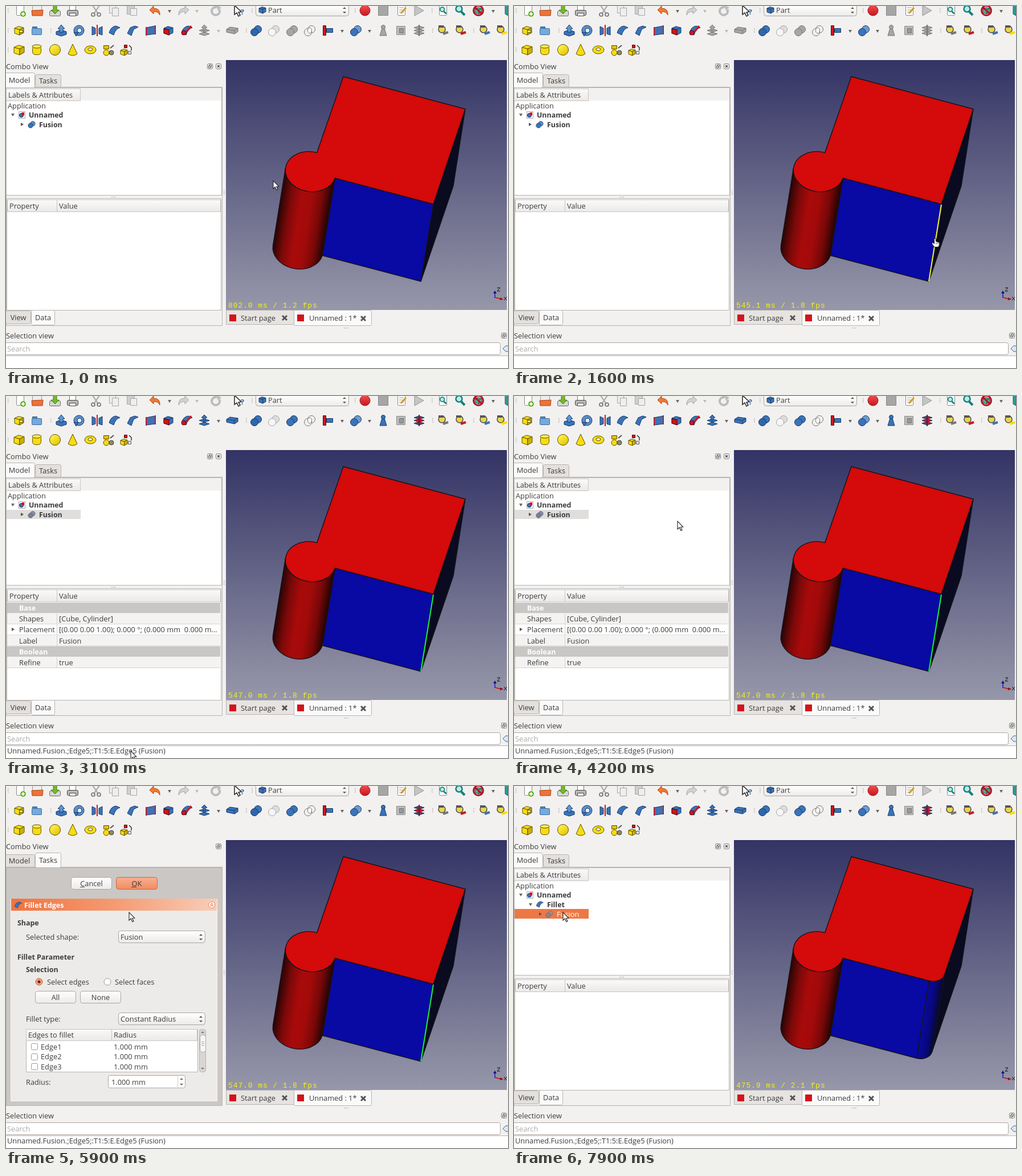
Recreate the animation shown at these times as an HTML page with a canvas. Size 881 px wide and 636 px high, loop 8000 ms.

```html
<!DOCTYPE html>
<html lang="en">
<head>
<meta charset="utf-8">
<title>Fillet an edge</title>
<style>
html, body { margin: 0; width: 881px; height: 636px; overflow: hidden; background: #f2f1f0; }
canvas { display: block; }
</style>
</head>
<body>
<canvas id="stage" width="881" height="636"></canvas>
<script>
const g = document.getElementById('stage').getContext('2d');
const FACE = '"Open Sans", "Noto Sans", sans-serif';
const BG = '#f2f1f0', INK = '#3c3c3c', LINE = '#b8b4b0';
const BLUE = '#3b73b9', NAVY = '#173a68', YELLOW = '#f7dc10', OLIVE = '#5c5000';
const GRAY = '#a6a6a6', DIM = '#747474', RED = '#d0141c', ORANGE = '#ee7845';
const PI = Math.PI;

// ---- basic drawing ----
function paint(fill, stroke, w = 1) {
  if (fill) { g.fillStyle = fill; g.fill(); }
  if (stroke) { g.strokeStyle = stroke; g.lineWidth = w; g.stroke(); }
}
function rect(x, y, w, h, fill, stroke, r = 0) {
  const o = stroke ? 0.5 : 0;
  g.beginPath();
  g.roundRect(x + o, y + o, w - 2 * o, h - 2 * o, r);
  paint(fill, stroke);
}
function disc(x, y, r, fill, stroke, w, ry = r) {
  g.beginPath();
  g.ellipse(x, y, r, ry, 0, 0, 2 * PI);
  paint(fill, stroke, w);
}
function trace(p) {
  g.beginPath();
  for (let i = 0; i < p.length; i += 2) g.lineTo(p[i], p[i + 1]);
}
function poly(p, fill, stroke, w) { trace(p); g.closePath(); paint(fill, stroke, w); }
function line(p, stroke, w) { trace(p); paint(null, stroke, w); }
function at(x, y, draw, ...args) { g.save(); g.translate(x, y); draw(...args); g.restore(); }
function text(s, x, y, color = INK, bold = false, align = 'left') {
  g.font = bold ? `bold 12.4px ${FACE}` : `12.8px ${FACE}`;
  g.fillStyle = color;
  g.textAlign = align;
  g.fillText(s, x, y + 4.5);
}
function ramp(x0, y0, x1, y1, ...colors) {
  const r = g.createLinearGradient(x0, y0, x1, y1);
  colors.forEach((c, i) => r.addColorStop(i / (colors.length - 1), c));
  return r;
}
const down = (x, y, c = '#666') => poly([x - 3, y - 2, x + 3, y - 2, x, y + 3], c);
const right = (x, y) => poly([x - 2, y - 3, x + 3, y, x - 2, y + 3], '#555');
function dots(x, y, vertical = true) {
  for (let i = -4; i <= 4; i += 3) rect(x + (vertical ? 0 : i), y + (vertical ? i : 0), 1.5, 1.5, '#b4b0ac');
}

// ---- toolbar icons, drawn around their own centre ----
function box(c, edge, s = 9) {
  poly([-s, -s * .5, s * .1, -s * .2, s * .1, s, -s, s * .6], c, edge);
  poly([-s, -s * .5, -s * .1, -s * .9, s, -s * .6, s * .1, -s * .2], c, edge);
  poly([s * .1, -s * .2, s, -s * .6, s, s * .5, s * .1, s], edge === OLIVE ? '#cdb100' : c, edge);
}
function bend(c, edge) {
  g.beginPath();
  g.moveTo(-9, 4); g.quadraticCurveTo(-6, -7, 3, -8); g.lineTo(10, -5);
  g.quadraticCurveTo(2, -3, -1, 8);
  g.closePath();
  paint(c, edge);
}
function pair(a, b, edge) { disc(3, -2, 6.5, a, edge); disc(-3, 3, 6.5, b, edge); }
function slabs(c, edge) {
  for (const y of [5, 0, -5]) poly([-9, y, 0, y - 3, 9, y, 0, y + 3], c, edge);
}
function sheet(c = '#fdfdfd') { rect(-7, -10, 14, 19, c, '#8d8d8d', 1); }
function curl(c, edge, flip) {
  g.scale(flip, 1);
  g.beginPath();
  g.moveTo(-10, -1); g.lineTo(-3, -8); g.lineTo(-3, -4);
  g.quadraticCurveTo(9, -4, 8, 8); g.quadraticCurveTo(5, 1, -3, 2); g.lineTo(-3, 6);
  g.closePath();
  paint(c, edge);
}
function lens() { disc(-2, -3, 5.5, '#bfe9e4', '#12807c', 2.5); line([2, 2, 8, 8], '#12807c', 4); }
function gauge(c) {
  disc(-2, -2, 6, '#e8d44c', '#4b4b4b', 1.5);
  rect(-8, -9, 9, 4, '#555');
  line([0, 6, 9, 3], c, 4);
}

function topRow() {
  at(25, 8, () => { sheet(); disc(5, 6, 5, '#69b52b'); line([5, 3, 5, 9], '#fff', 2); line([2, 6, 8, 6], '#fff', 2); });
  at(55, 8, () => { rect(-9, -10, 17, 14, '#eee', '#999'); poly([-10, 0, 10, -1, 9, 9, -9, 9], '#ee7237', '#a9471a'); });
  at(86, 8, () => { rect(-10, 0, 20, 10, '#d7d7d7', '#666', 2); poly([-3, -9, 3, -9, 3, -1, 7, -1, 0, 6, -7, -1, -3, -1], '#76b82c', '#477d12'); });
  at(117, 8, () => { rect(-6, -9, 12, 9, '#fff', '#777'); rect(-10, -1, 20, 10, '#b9b9b9', '#444', 2); rect(-6, 4, 12, 6, '#eee', '#555'); });
  at(158, 8, () => { line([-6, -9, 4, 6], GRAY, 2); line([6, -9, -4, 6], GRAY, 2); disc(-5, 7, 3, null, DIM, 1.7); disc(5, 7, 3, null, DIM, 1.7); });
  at(189, 8, () => { rect(-8, -10, 12, 15, '#eee', GRAY); rect(-3, -5, 12, 15, '#eee', GRAY); });
  at(220, 8, () => { rect(-8, -10, 14, 17, '#cfcfcf', GRAY); rect(-2, -4, 12, 13, '#eee', GRAY); });
  at(262, 8, curl, '#f27935', '#b34a12', 1);
  down(287, 9);
  at(311, 8, curl, '#d2d2d2', GRAY, -1);
  down(335, 9, '#bbb');
  at(368, 8, () => { g.beginPath(); g.arc(0, 1, 7, -.4, 5.1); paint(null, '#bcbcbc', 4); poly([3, -9, 10, -5, 3, 0], '#bcbcbc'); });
  at(409, 8, () => { poly([-8, -9, -8, 7, -4, 4, -1, 10, 2, 8, -1, 3, 4, 2], '#fff', '#222', 1.5); text('?', 3, 2, '#2a66a8', true); });
  rect(438, -8, 164, 26, ramp(0, 0, 0, 18, '#fff', '#eceae8'), '#a9a49f', 4);
  at(450, 7, box, BLUE, NAVY, 6);
  text('Part', 460, 7);
  poly([591, 5, 597, 5, 594, 2], '#555'); poly([591, 10, 597, 10, 594, 13], '#555');
  disc(630, 8, 9, ramp(0, 0, 0, 18, '#f04a4a', '#c01420'), '#a3111a');
  rect(653, -1, 18, 18, GRAY, '#888');
  at(694, 8, () => { sheet(); for (let y = -5; y < 7; y += 4) line([-4, y, 4, y], '#999'); line([-1, 5, 8, -5], '#d59a20', 3); });
  at(724, 8, () => poly([-7, -9, 9, 0, -7, 9], '#c5c5c5', '#929292'));
  at(767, 8, () => { sheet(); g.scale(.7, .7); lens(); });
  at(797, 8, lens);
  at(829, 8, () => { box('#54a9a7', '#14504f', 6); disc(0, 0, 8.5, null, '#b5141c', 3); line([-6, -6, 6, 6], '#b5141c', 3); });
  down(855, 9);
  poly([876, -2, 881, -4, 881, 17, 876, 14], '#2d9e9a', '#135e5c');
  [3, 431, 612, 747].forEach(x => dots(x, 8));
}

function midRow(on) {
  const c = on ? BLUE : GRAY, e = on ? NAVY : DIM, y = 43;
  at(23, y, () => { box(YELLOW, OLIVE, 8); rect(0, -1, 7, 5, '#fff06a', OLIVE); });
  at(54, y, () => { rect(-8, -7, 9, 5, '#4c86c4', '#2f6399'); rect(-9, -4, 18, 12, '#78a9d8', '#3a6ea8', 1); });
  at(97, y, () => { poly([-9, 2, 0, -1, 9, 2, 9, 7, 0, 10, -9, 7], BLUE, NAVY); poly([-3, 3, -3, -3, -6, -3, 0, -10, 6, -3, 3, -3, 3, 3], '#5c95d5', NAVY); });
  at(128, y, () => { disc(0, 0, 9, '#5b8fc9', NAVY); disc(1, 0, 4, '#e5edf6', NAVY); poly([-9, 3, -1, 4, -5, 10], BLUE, NAVY); });
  at(160, y, () => { poly([-9, -7, -3, -4, -3, 6, -9, 8], BLUE, NAVY); poly([9, -7, 3, -4, 3, 6, 9, 8], BLUE, NAVY); line([0, -10, 0, 10], RED, 2); });
  at(190, y, bend, BLUE, NAVY);
  at(222, y, () => poly([-9, 5, -4, -5, 4, -8, 10, -6, 2, -2, -2, 9], BLUE, NAVY));
  at(254, y, () => { poly([-8, -5, 8, -8, 8, 6, -8, 8], BLUE, NAVY); line([-8, -6, -8, 9], RED, 2); line([8, -9, 8, 7], RED, 2); });
  at(285, y, () => { box(BLUE, NAVY, 8); poly([-8, -3, 1, -1, 1, 8, -8, 5], RED, '#560a0d'); });
  at(317, y, () => { bend(BLUE, NAVY); line([-8, 7, 2, 0, 8, -8], RED, 3); disc(-5, 4, 4, RED, '#560a0d'); });
  at(348, y, () => { poly([-9, 6, 0, 3, 9, 6, 0, 9], c, e); poly([-9, 0, 0, -3, 9, 0, 0, 3], c, e); poly([-2, 0, -2, -5, -5, -5, 0, -10, 5, -5, 2, -5, 2, 0], c, e); });
  down(373, 44, on ? '#666' : '#bbb');
  at(397, y, () => { poly([-10, -2, -4, -6, 10, -4, 10, 2, 4, 6, -10, 3], c, e); line([-10, -2, 4, 0, 10, -4], e); line([4, 0, 4, 6], e); });
  at(439, y, pair, BLUE, '#2f66ab', NAVY);
  at(470, y, pair, '#ddd', '#f6f6f6', GRAY);
  at(502, y, pair, c, c, e);
  at(533, y, () => { pair(BG, BG, DIM); disc(0, 0, 3.5, '#fff', DIM, 1, 5); });
  at(565, y, () => { rect(-3, -4, 12, 8, BLUE, NAVY); rect(-9, -9, 6, 18, RED, '#560a0d'); });
  at(614, y, pair, '#6d9cd2', BLUE, NAVY);
  at(662, y, () => { poly([-2, -4, 2, -4, 6, 9, -6, 9], c, e); disc(0, -6, 3.5, c, e); });
  at(693, y, () => { rect(-8, -8, 16, 16, '#bbb', '#8f8f8f'); rect(-3, -4, 8, 9, '#999', DIM); });
  at(725, y, slabs, on ? RED : GRAY, e);
  line([725, 33, 725, 53], e, 2);
  at(767, y, gauge, '#777');
  at(798, y, gauge, RED);
  at(840, y, gauge, BLUE);
  at(870, y, gauge, YELLOW);
  down(590, 44); down(638, 44);
  [3, 78, 421, 748, 820].forEach(x => dots(x, y));
}

function lowRow() {
  const y = 77;
  at(23, y, box, YELLOW, OLIVE);
  at(54, y, () => { rect(-8, -7, 16, 16, YELLOW, OLIVE, 5); disc(0, -6, 8, '#fbe95a', OLIVE, 1, 3); });
  disc(86, y, 9.5, ramp(80, 70, 92, 86, '#fff04a', '#e3c300'), OLIVE);
  at(117, y, () => { g.beginPath(); g.moveTo(0, -10); g.lineTo(8, 7); g.quadraticCurveTo(0, 13, -8, 7); g.closePath(); paint(YELLOW, OLIVE); });
  disc(148, y, 10, YELLOW, OLIVE, 1, 7); disc(148, y - 1, 4, BG, OLIVE, 1, 2.5);
  at(180, y, () => { rect(-9, -8, 10, 7, '#e3c300', OLIVE); disc(-4, 5, 5, YELLOW, OLIVE); disc(5, 5, 4, '#8c8c5c', '#444'); line([3, -3, 9, -8], '#555', 2); });
  at(211, y, () => { at(-4, 4, box, YELLOW, OLIVE, 6); rect(-4, -9, 6, 6, RED, '#560a0d'); rect(3, 2, 6, 6, '#eee', '#555'); line([5, -8, 9, -4, 9, 1], '#333', 1.5); });
  dots(3, y);
}

// ---- the solid: cube with a cylinder on one corner ----
function arc(x, y, k, from, to, ccw) {
  g.save();
  g.transform(214 * k, 57 * k, -56 * k, 167 * k, x, y);
  g.arc(0, 0, 1, from, to, ccw);
  g.restore();
}
function solid(round, hover, edge) {
  const ink = '#141418', glow = '#e1e114';
  poly(round ? [755.6, 331.3, 806, 181, 785, 316, 733.6, 467.3] : [750, 348, 806, 181, 785, 316, 728, 484], '#0a0a20', ink, 1.4);
  g.beginPath();
  g.moveTo(577.5, 302.4);
  arc(512.5, 427, .2, 0, 3.01);
  arc(534.5, 291, .2, 3.01, 0, true);
  g.closePath();
  paint(hover === 'side' ? glow : ramp(490, 289, 578, 303, '#2a0404', '#7c0909', '#a80a0a', '#a30a0a', '#780808', '#1c0303'), ink, 1.4);
  const x = round ? 728.6 : 750, y = round ? 342.3 : 348;
  poly([577.5, 302.4, x, y, x - 22, y + 136, 555.5, 438.4], hover === 'front' ? glow : '#0909a4', ink, 1.4);
  if (round) {
    g.beginPath();
    arc(734.2, 325.6, .1, PI / 2, 0, true);
    arc(712.2, 461.6, .1, 0, PI / 2);
    g.closePath();
    paint(ramp(717, 400, 745, 404, '#0909a4', '#080880', '#07072c'), ink, 1.4);
  }
  g.beginPath();
  g.moveTo(592, 124);
  g.lineTo(806, 181);
  if (round) arc(734.2, 325.6, .1, 0, PI / 2); else g.lineTo(750, 348);
  arc(534.5, 291, .2, 0, 1.5 * PI);
  g.closePath();
  paint('#d50a0a', ink, 1.4);
  if (edge) line([750, 349, 728, 484], edge, 2);
}
function view(s) {
  rect(386, 95, 493, 439, ramp(0, 95, 0, 534, '#333365', '#9797aa'));
  solid(s.done, s.hover, s.edge);
  g.font = '13px "Liberation Mono", monospace';
  g.letterSpacing = '.9px';
  g.textAlign = 'left';
  g.fillStyle = '#f2f215';
  g.fillText(s.status, 390, 530);
  g.letterSpacing = '0px';
  line([858, 513, 858, 503], '#1c1cc0', 1.5); poly([855, 505, 858, 500, 861, 505], '#10107a');
  line([858, 512, 869, 515], '#c01010', 1.5); poly([867, 512, 873, 515, 867, 517], '#8c1010');
  line([862, 495, 867, 495, 862, 501, 867, 501], '#111'); line([874, 511, 879, 517], '#111'); line([879, 511, 874, 517], '#111');
}

// ---- widgets ----
function button(x, y, w, s, hot) {
  rect(x, y, w, 22, hot ? ramp(0, y, 0, y + 22, '#fab091', '#f08b62') : ramp(0, y, 0, y + 22, '#fff', '#eceae8'), hot ? '#c56a45' : '#aaa5a0', 4);
  text(s, x + w / 2, y + 11, INK, false, 'center');
}
function combo(x, y, w, s) {
  rect(x, y, w, 22, ramp(0, y, 0, y + 22, '#fff', '#eceae8'), '#aaa5a0', 4);
  text(s, x + 4, y + 11);
  poly([x + w - 11, y + 9, x + w - 5, y + 9, x + w - 8, y + 6], '#555');
  poly([x + w - 11, y + 14, x + w - 5, y + 14, x + w - 8, y + 17], '#555');
}
function tab(x, y, w, h, s, active) {
  rect(x, y, w, h, active ? '#fbfafa' : '#e3e0dd', LINE, 3);
  text(s, x + w / 2, y + h / 2, INK, false, 'center');
}
function dockButton(x, y, close) {
  rect(x - 5, y - 5, 10, 10, '#f8f7f6', '#777', 2);
  if (close) { line([x - 2, y - 2, x + 2, y + 2], '#444', 1.5); line([x + 2, y - 2, x - 2, y + 2], '#444', 1.5); }
  else { rect(x - 2, y - 3, 5, 5, null, '#555'); rect(x - 3, y - 1, 4, 4, '#f8f7f6', '#555'); }
}
function cross(x, y) { line([x - 4, y - 4, x + 4, y + 4], '#555', 3); line([x + 4, y - 4, x - 4, y + 4], '#555', 3); }
function header(x, y, w, h, split, a, b) {
  rect(x, y, w, h, ramp(0, y, 0, y + h, '#fbfafa', '#ebe9e7'), '#c8c4c0');
  line([split + .5, y, split + .5, y + h], '#c8c4c0');
  text(a, x + 4, y + h / 2);
  text(b, split + 4, y + h / 2);
}

function tree(s) {
  rect(0, 143, 379, 190, '#fff', LINE);
  rect(1, 144, 377, 22, BG);
  rect(0, 145, 131, 22, ramp(0, 145, 0, 167, '#fbfafa', '#ebe9e7'), '#c8c4c0');
  text('Labels & Attributes', 4, 156);
  text('Application', 3, 175);
  down(12, 191);
  rect(22, 185, 12, 13, '#f4f4f4', '#aaa'); disc(27, 192, 3.5, BLUE, NAVY); rect(28, 187, 4, 5, RED);
  text('Unnamed', 40, 191, INK, true);
  const small = (x, y, draw, ...a) => at(x, y, () => { g.scale(.65, .65); draw(...a); });
  if (!s.done) {
    if (s.sel) rect(1, 200, 130, 16, '#e0dedc');
    right(28, 208);
    small(45, 208, pair, s.sel ? '#858ba0' : '#5a8ac4', s.sel ? '#777d94' : BLUE, s.sel ? '#5a6076' : NAVY);
    text('Fusion', 58, 208, INK, true);
    return;
  }
  down(29, 208);
  if (s.fresh) {
    g.setLineDash([1, 1]);
    rect(36, 200, 95, 16, '#fff', '#888');
    g.setLineDash([]);
    text('Fillet', 39, 208, INK, true);
  } else {
    small(45, 208, bend, BLUE, NAVY);
    text('Fillet', 58, 208, INK, true);
  }
  rect(1, 216, 130, 17, ORANGE);
  right(46, 225);
  small(62, 225, pair, '#a58a88', '#95807f', '#7a6562');
  text('Fusion', 75, 225, '#fff');
}

function properties(filled) {
  rect(1, 338, 377, 197, '#fff', LINE);
  header(2, 340, 375, 22, 89, 'Property', 'Value');
  if (!filled) return;
  const rows = [['Base'], ['Shapes', '[Cube, Cylinder]'],
    ['Placement', '[(0.00 0.00 1.00); 0.000 °; (0.000 mm  0.000 m…'],
    ['Label', 'Fusion'], ['Boolean'], ['Refine', 'true']];
  rows.forEach(([key, value], i) => {
    const y = 363 + i * 19.2, group = !value;
    rect(2, y, 374, 18.5, group ? '#c8c7c6' : i === 2 ? '#fff' : '#f4f3f2');
    text(key, 23, y + 9.5, group ? '#fff' : INK, group);
    if (group) return;
    line([2, y + 18.5, 376, y + 18.5], '#d4d2d0');
    line([89.5, y, 89.5, y + 19], '#d4d2d0');
    text(value, 93, y + 9.5);
  });
  right(12, 410);
}

function dialog() {
  rect(0, 143, 380, 419, '#cbc7c4', LINE);
  button(114, 160, 72, 'Cancel');
  button(193, 160, 73, 'OK', true);
  line([130, 177.5, 138, 177.5], INK); line([220, 177.5, 229, 177.5], INK);
  rect(8, 198, 363, 356, '#edebe9', '#f7f5f4');
  rect(9, 198, 361, 21, ramp(9, 0, 370, 0, '#f0733f', '#f59a72', '#f9cdb8'));
  at(21, 209, () => { g.scale(.65, .65); bend(BLUE, NAVY); });
  text('Fillet Edges', 32, 209, '#fff', true);
  disc(361, 209, 5.5, '#fff6f0', '#dc8c68');
  for (const y of [208, 211]) line([358.5, y + 1, 361, y - 2, 363.5, y + 1], '#c8643a');
  text('Shape', 20, 240, INK, true);
  text('Selected shape:', 35, 265);
  combo(197, 254, 153, 'Fusion');
  text('Fillet Parameter', 20, 300, INK, true);
  text('Selection', 35, 322, INK, true);
  disc(58, 344, 6, '#f4a27e', '#b8603a'); disc(58, 344, 2.5, '#5c2a16');
  text('Select edges', 72, 344);
  disc(178, 344, 6, '#fff', '#999');
  text('Select faces', 191, 344);
  button(51, 360, 72, 'All');
  button(130, 360, 72, 'None');
  text('Fillet type:', 35, 409);
  combo(197, 398, 153, 'Constant Radius');
  rect(35, 427, 302, 76, '#fff', LINE);
  header(35, 427, 301, 21, 185, 'Edges to fillet', 'Radius');
  for (let i = 0; i < 3; i++) {
    const y = 458 + i * 17.5;
    rect(44, Math.round(y) - 6, 12, 12, '#fff', '#999', 2);
    text('Edge' + (i + 1), 61, y);
    text('1.000 mm', 189, y);
  }
  rect(339, 427, 12, 76, '#d8d5d2', LINE, 4);
  rect(340, 437, 11, 31, '#f6f5f4', '#aaa', 4);
  for (const y of [450, 453, 456]) line([343, y - .5, 348, y - .5], '#aaa');
  poly([342, 434, 348, 434, 345, 431], '#777'); poly([342, 495, 348, 495, 345, 498], '#777');
  text('Radius:', 35, 520);
  rect(179, 508, 136, 23, '#fff', '#aaa5a0', 3);
  line([301.5, 510, 301.5, 529], '#ccc');
  text('1.000 mm', 185, 520);
  poly([305, 516, 311, 516, 308, 513], '#666'); poly([305, 523, 311, 523, 308, 526], '#666');
}

function panels(s) {
  text('Combo View', 0, 106);
  if (!s.dialog) dockButton(358, 106);
  dockButton(373, 106, !s.dialog);
  rect(0, 142, 380, 420, BG, LINE);
  tab(-4, s.dialog ? 120 : 117, 55, s.dialog ? 23 : 27, 'Model', !s.dialog);
  tab(51, s.dialog ? 117 : 120, 46, s.dialog ? 27 : 23, 'Tasks', s.dialog);
  if (s.dialog) dialog();
  else {
    tree(s);
    dots(189, 335, false);
    properties(s.sel && !s.done);
    tab(-1, 535, 45, 24, 'View');
    tab(44, 534, 42, 27, 'Data', true);
  }
  dots(382, 328);
  rect(386, 534, 120, 26, '#e6e3e0', LINE);
  rect(505, 534, 137, 28, '#fbfafa', LINE, 2);
  rect(392, 542, 12, 12, RED); rect(511, 542, 12, 12, RED);
  text('Start page', 412, 548); cross(489, 548);
  text('Unnamed : 1*', 532, 548.5); cross(627, 549);
  dots(597, 565, false);
  text('Selection view', 0, 579);
  dockButton(874, 579);
  rect(-3, 591, 871, 22, '#fff', '#aaa5a0', 3);
  text('Search', 2, 602, '#aaa');
  poly([872, 602, 877, 597, 884, 597, 884, 607, 877, 607], '#dce6f2', '#3465a4');
  rect(0, 614, 881, 22, '#fff');
  line([0, 614.5, 881, 614.5], LINE);
  if (s.sel) text('Unnamed.Fusion.;Edge5;:T1:5:E.Edge5 (Fusion)', 2, 623);
}

// ---- pointer ----
const PATH = [
  [200, 469, 307], [500, 540, 350], [800, 640, 385], [1400, 737, 408], [1800, 737, 408],
  [2100, 615, 507], [2600, 254, 624], [2900, 177, 625], [3200, 240, 623], [3500, 190, 627],
  [3600, 190, 627], [3900, 306, 460], [4200, 287, 220], [4400, 232, 63], [4500, 216, 82],
  [4800, 187, 45], [5300, 187, 45], [5900, 216, 222], [6200, 222, 165], [6400, 222, 165],
  [7000, 120, 199], [7400, 16, 212], [7900, 86, 222]
];
function pointer(t) {
  const i = PATH.findIndex(k => k[0] > t);
  if (i === 0) return PATH[0].slice(1);
  if (i < 0) return PATH[PATH.length - 1].slice(1);
  const [t0, x0, y0] = PATH[i - 1], [t1, x1, y1] = PATH[i], f = (t - t0) / (t1 - t0);
  return [x0 + (x1 - x0) * f, y0 + (y1 - y0) * f];
}
function arrow() { poly([0, 0, 0, 14, 3.3, 11, 5.8, 16.5, 8, 15.5, 5.6, 10.3, 9.8, 10], '#fff', '#222', 1.1); }
function hand() {
  poly([4, 0, 6.5, 0, 7, 5, 13, 7, 13, 11, 11, 15, 4, 15, 0, 9, 1, 7, 4, 9], '#fff', '#222');
  for (const x of [7, 9, 11]) line([x, 7, x, 10], '#555', .8);
}

function state(t) {
  const sel = t >= 1900, done = t >= 6300;
  const hover = t >= 500 && t < 800 ? 'side' : t >= 800 && t < 1300 ? 'front' : '';
  const status = t < 500 ? '802.0 ms / 1.2' : t < 800 ? '548.6 ms / 1.8' : t < 1300 ? '546.3 ms / 1.8'
    : !sel ? '545.1 ms / 1.8' : !done ? '547.0 ms / 1.8' : t < 7500 ? '506.6 ms / 2.0' : '475.9 ms / 2.1';
  return {
    sel, done, hover, status: status + ' fps',
    edge: done || t < 1300 ? '' : sel ? '#18f030' : '#f4f42a',
    dialog: t >= 5500 && !done, fresh: t < 6700
  };
}

function frame(now) {
  const t = Math.floor(now % 8000 / 100) * 100, s = state(t);
  rect(0, 0, 881, 636, BG);
  if (t >= 4700 && t < 5500) rect(175, 28, 32, 31, '#faf9f8', LINE, 4);
  topRow();
  midRow(s.sel);
  lowRow();
  view(s);
  panels(s);
  if (t >= 1600 && t < 1800) at(733.5, 408.5, hand);
  else at(...pointer(t), arrow);
  requestAnimationFrame(frame);
}
requestAnimationFrame(frame);
</script>
</body>
</html>
```
